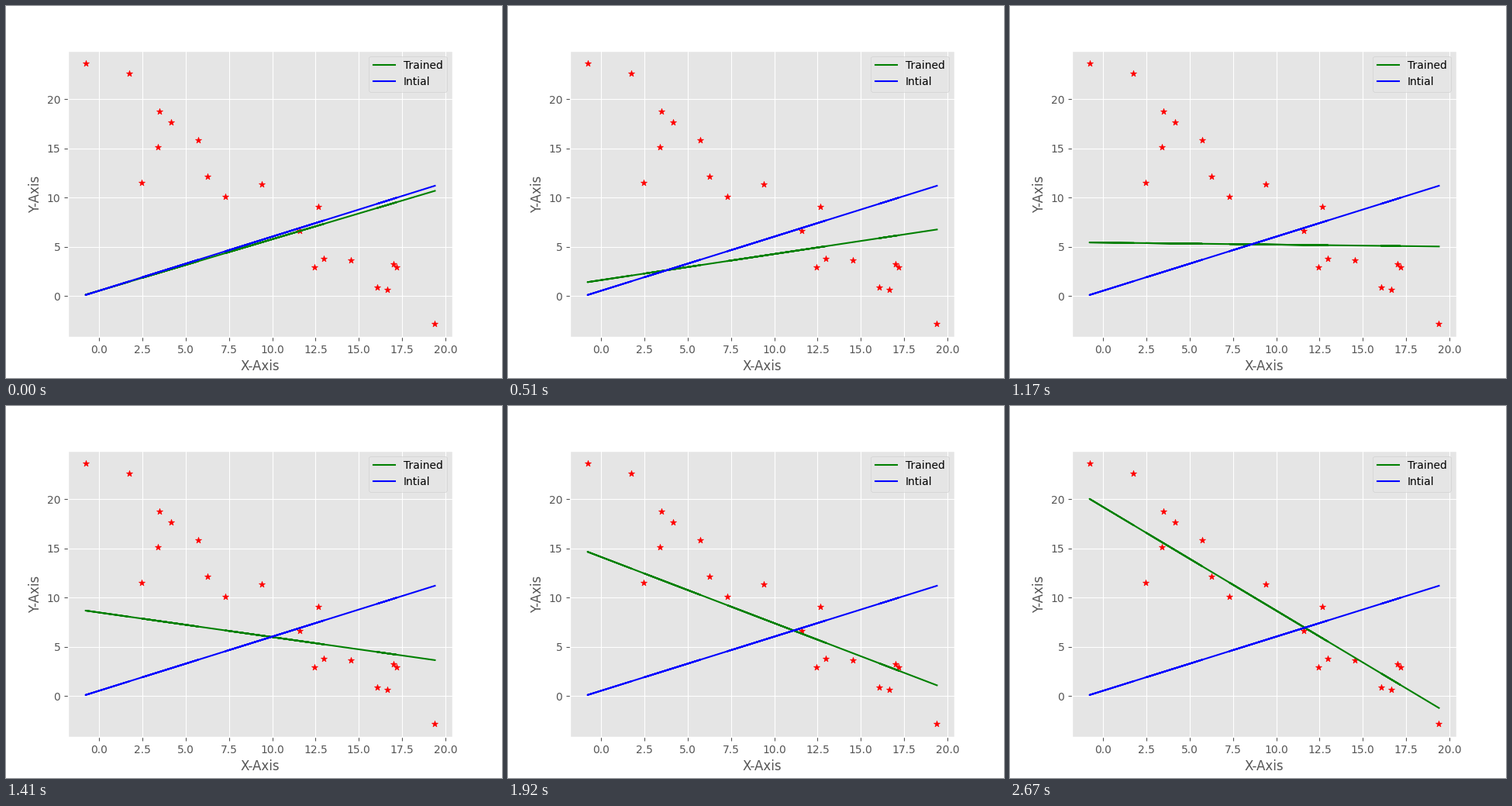
Animation, 640 px wide and 480 px high, one loop 2700 ms. Source, as a matplotlib script:

```python
import numpy as np
import matplotlib.pyplot as plt
from matplotlib.animation import FuncAnimation

RATE = 0.001
START = (0.55, 0.537)  # slope, intercept
FRAMES = 90

# Samples are unsorted within each run, so the fit lines retrace themselves.
x = np.array([1.74, -0.795, 5.72, 4.15, 3.49, 3.4, 2.46, 6.26, 12.99, 12.67,
              12.45, 11.58, 9.39, 7.29, 14.55, 17.18, 17.01, 16.65, 16.06, 19.4])
y = np.array([22.63, 23.62, 15.86, 17.66, 18.77, 15.15, 11.52, 12.15, 3.8, 9.08,
              2.93, 6.63, 11.35, 10.1, 3.64, 2.93, 3.24, 0.64, 0.88, -2.855])


def stride(epoch):
    """Epochs between shown fits: every one at first, then doubling gaps."""
    if epoch < 10:
        return 1
    return 25 * 2 ** sum(epoch >= limit for limit in (500, 1000, 3000))


def predict(fit):
    return fit[0] * x + fit[1]


def train():
    """Gradient descent on the mean squared error; returns the shown fits."""
    fit = np.array(START)
    fits = []
    epoch = 0
    while len(fits) < FRAMES:
        error = predict(fit) - y
        fit = fit - RATE * np.array([np.mean(error * x), np.mean(error)])
        # The first strided epoch is a full stride from zero.
        if epoch % stride(epoch) == 0:
            fits.append(fit)
        epoch += 1
    return fits


fits = train()

plt.style.use("ggplot")
fig, ax = plt.subplots(figsize=(6.4, 4.8), dpi=100)
ax.scatter(x, y, marker="*", color="red")
trained, = ax.plot(x, predict(fits[0]), color="green", label="Trained")
ax.plot(x, predict(START), color="blue", label="Intial")
ax.set_xlabel("X-Axis")
ax.set_ylabel("Y-Axis")
ax.legend(loc="upper right")


def update(frame):
    trained.set_ydata(predict(fits[frame]))
    return trained,


anim = FuncAnimation(fig, update, frames=FRAMES, interval=30,
                     repeat=True, repeat_delay=0)
plt.show()
```
